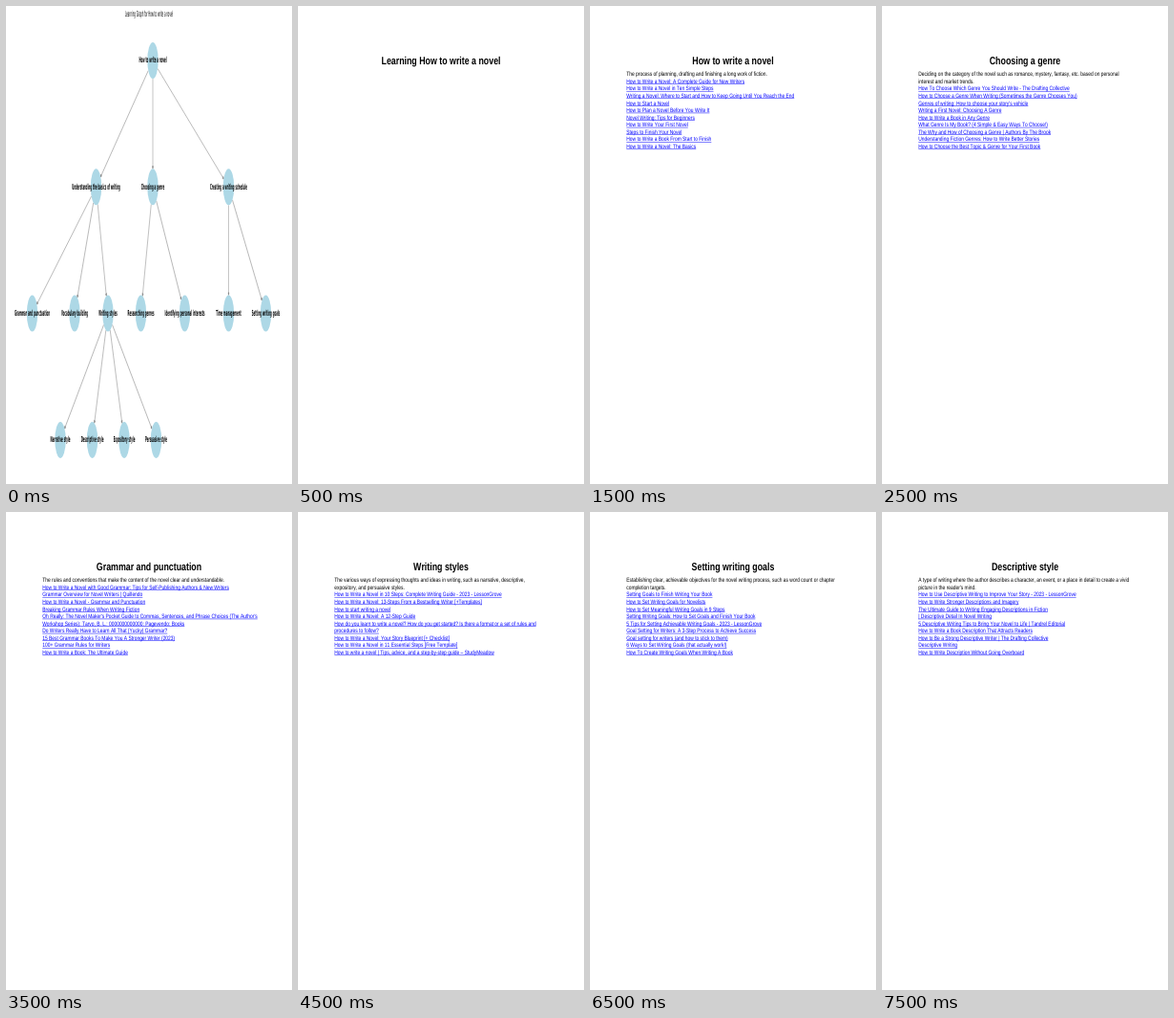
These frames come from a looping animation (300x500 px, 8000 ms). An HTML page with a canvas:

```html
<!DOCTYPE html>
<html lang="en">
<head>
<meta charset="utf-8">
<title>How to write a novel</title>
<style>
html, body { margin: 0; width: 100%; height: 100%; overflow: hidden; background: #fff; }
canvas { display: block; width: 300px; height: 500px; }
</style>
</head>
<body>
<canvas id="stage" width="300" height="500"></canvas>
<script>
const ctx = document.getElementById('stage').getContext('2d');
const W = 300, H = 500, HOLD = 500;
const SANS = '"Liberation Sans", Arial, sans-serif';
const CHART = '"DejaVu Sans", sans-serif';

// Sheets are drawn in points and squeezed onto the stage.
function sheet(w, h) {
  ctx.setTransform(1, 0, 0, 1, 0, 0);
  ctx.fillStyle = '#fff';
  ctx.fillRect(0, 0, W, H);
  ctx.setTransform(W / w, 0, 0, H / h, 0, 0);
  ctx.fontKerning = 'none';
  ctx.textRendering = 'geometricPrecision';
}

function text(str, x, y, font, color = '#000', align = 'left') {
  ctx.font = font;
  ctx.fillStyle = color;
  ctx.textAlign = align;
  ctx.fillText(str, x, y);
}

// Learning graph: label, x, level, index of the parent
const nodes = [
  ['How to write a novel', 154, 0, -1],
  ['Understanding the basics of writing', 94.5, 1, 0],
  ['Choosing a genre', 154, 1, 0],
  ['Creating a writing schedule', 233.5, 1, 0],
  ['Grammar and punctuation', 27.5, 2, 1],
  ['Vocabulary building', 72, 2, 1],
  ['Writing styles', 107, 2, 1],
  ['Researching genres', 141.5, 2, 2],
  ['Identifying personal interests', 187.5, 2, 2],
  ['Time management', 233.5, 2, 3],
  ['Setting writing goals', 272.5, 2, 3],
  ['Narrative style', 57, 3, 6],
  ['Descriptive style', 90.5, 3, 6],
  ['Expository style', 124, 3, 6],
  ['Persuasive style', 157.5, 3, 6]
].map(([label, x, level, parent]) =>
  ({ label, parent, x: x * 4.8, y: (57 + level * 132.3) * 1.44 }));

function arrow(a, b, r) {
  const angle = Math.atan2(b.y - a.y, b.x - a.x);
  const len = Math.hypot(b.x - a.x, b.y - a.y);
  ctx.save();
  ctx.translate(a.x, a.y);
  ctx.rotate(angle);
  ctx.strokeStyle = ctx.fillStyle = '#808080';
  ctx.lineWidth = 1;
  ctx.beginPath();
  ctx.moveTo(r, 0);
  ctx.lineTo(len - r - 1, 0);
  ctx.stroke();
  ctx.beginPath();
  ctx.moveTo(len - r, 0);
  ctx.lineTo(len - r - 4, -2);
  ctx.lineTo(len - r - 4, 2);
  ctx.closePath();
  ctx.fill();
  ctx.stroke();
  ctx.restore();
}

function drawGraph() {
  const r = Math.sqrt(3000) / 2;
  sheet(1440, 720);
  text('Learning Graph for How to write a novel', 720, 16, '12px ' + CHART, '#000', 'center');
  for (const n of nodes) if (n.parent >= 0) arrow(nodes[n.parent], n, r);
  ctx.fillStyle = '#add8e6';
  for (const n of nodes) {
    ctx.beginPath();
    ctx.arc(n.x, n.y, r, 0, 2 * Math.PI);
    ctx.fill();
  }
  for (const n of nodes) text(n.label, n.x, n.y + 3.3, 'bold 12px ' + CHART, '#000', 'center');
}

function heading(str) {
  sheet(612, 792);
  text(str, 306, 96, 'bold 18px ' + SANS, '#000', 'center');
}

function drawContents() {
  const left = 234, top = 118, width = 144, row = 28.8;
  heading('Table of Contents');
  nodes.forEach((n, i) => {
    const y = top + i * row;
    ctx.fillStyle = i ? '#f5f5dc' : '#808080';
    ctx.fillRect(left, y, width, row);
    const lines = i === 1 ? ['Understanding the basics of', 'writing'] : [n.label];
    const base = y + row - (i ? 5 : 14);
    lines.forEach((s, k) =>
      text(s, left + 6, base - (lines.length - 1 - k) * 12, '10px ' + SANS));
  });
  ctx.strokeStyle = '#000';
  ctx.lineWidth = 1;
  ctx.beginPath();
  for (let i = 0; i <= nodes.length; i++) {
    ctx.moveTo(left, top + i * row);
    ctx.lineTo(left + width, top + i * row);
  }
  for (const x of [left, left + width]) {
    ctx.moveTo(x, top);
    ctx.lineTo(x, top + nodes.length * row);
  }
  ctx.stroke();
}

function drawPage(title, [intro, links]) {
  let y = 116;
  heading(title);
  for (const s of intro.split('\n')) {
    text(s, 78, y, '10px ' + SANS);
    y += 12;
  }
  for (const s of links.trim().split('\n')) {
    text(s, 78, y, '10px ' + SANS, '#00f');
    ctx.fillRect(78, y + 0.9, ctx.measureText(s).width, 0.8);
    y += 12;
  }
}

// Intro and links for each topic, in the order of the nodes
const pages = [
  ['The process of planning, drafting and finishing a long work of fiction.', `
How to Write a Novel: A Complete Guide for New Writers
How to Write a Novel in Ten Simple Steps
Writing a Novel: Where to Start and How to Keep Going Until You Reach the End
How to Start a Novel
How to Plan a Novel Before You Write It
Novel Writing: Tips for Beginners
How to Write Your First Novel
Steps to Finish Your Novel
How to Write a Book From Start to Finish
How to Write a Novel: The Basics`],
  ['Learning the essential parts of writing, such as grammar, vocabulary, and the many styles that\ncan be used in a novel.', `
The Basics of Writing: A Guide for Beginners
Basic Writing Skills Every Novelist Needs
How to Learn the Basics of Creative Writing
Understanding the Elements of a Novel
Writing Basics: How to Build Better Sentences
The Basics of Fiction Writing
How to Improve Your Writing Skills in 10 Steps
Creative Writing for Beginners
What Every New Writer Should Know`],
  ['Deciding on the category of the novel such as romance, mystery, fantasy, etc. based on personal\ninterest and market trends.', `
How To Choose Which Genre You Should Write - The Drafting Collective
How to Choose a Genre When Writing (Sometimes the Genre Chooses You)
Genres of writing: How to choose your story's vehicle
Writing a First Novel: Choosing A Genre
How to Write a Book in Any Genre
What Genre Is My Book? (4 Simple & Easy Ways To Choose!)
The Why and How of Choosing a Genre | Authors By The Brook
Understanding Fiction Genres: How to Write Better Stories
How to Choose the Best Topic & Genre for Your First Book`],
  ['Planning regular times for working on the novel in order to make steady progress and to\nfinish on time.', `
How to Create a Writing Schedule That Works
Creating a Writing Schedule: Tips for Busy Writers
How to Make a Writing Schedule and Stick to It
Writing Schedules: How to Find Your Best Time
How to Build a Daily Writing Habit
A Simple Writing Plan for Your First Novel
How to Plan Your Writing Week
Writing Every Day: Is It Really Needed?
How to Set Up a Writing Routine`],
  ['The rules and conventions that make the content of the novel clear and understandable.', `
How to Write a Novel with Good Grammar: Tips for Self-Publishing Authors & New Writers
Grammar Overview for Novel Writers | Quillendo
How to Write a Novel - Grammar and Punctuation
Breaking Grammar Rules When Writing Fiction
Oh Really: The Novel Maker's Pocket Guide to Commas, Sentences, and Phrase Choices (The Author's
Workshop Series): Tarvo, B. L.: 0000000000000: Pagevendo: Books
Do Writers Really Have to Learn All That (Yucky) Grammar?
15 Best Grammar Books To Make You A Stronger Writer (2023)
100+ Grammar Rules for Writers
How to Write a Book: The Ultimate Guide`],
  ['Expanding the range of words known and used, so that the writing is more precise and engaging\nfor the reader.', `
How to Build Your Vocabulary as a Writer
Vocabulary Building: Tips for Novel Writers
10 Ways to Improve Your Vocabulary
How to Use New Words in Your Writing
Building a Better Vocabulary for Fiction
Words Every Writer Should Know
How to Expand Your Vocabulary by Reading
Vocabulary Exercises for Creative Writers
Simple Ways to Learn New Words`],
  ['The various ways of expressing thoughts and ideas in writing, such as narrative, descriptive,\nexpository, and persuasive styles.', `
How to Write a Novel in 10 Steps: Complete Writing Guide - 2023 - LessonGrove
How to Write a Novel: 13-Steps From a Bestselling Writer [+Templates]
How to start writing a novel
How to Write a Novel: A 12-Step Guide
How do you learn to write a novel? How do you get started? Is there a format or a set of rules and
procedures to follow?
How to Write a Novel: Your Story Blueprint [+ Checklist]
How to Write a Novel in 11 Essential Steps [Free Template]
How to write a novel | Tips, advice, and a step-by-step guide – StudyMeadow`],
  ['Studying the features and conventions of different genres to find out what readers expect of\neach one.', `
How to Research Your Genre Before Writing
Researching Genres: A Guide for Novelists
Book Genres: A Complete List for Writers
How to Study a Genre by Reading
What Readers Expect From Each Genre
Genre Research Tips for New Writers
How to Research a Novel
Fiction Genres and Their Conventions
How to Find the Right Genre for Your Book`],
  ['Reflecting on the themes, subjects and kinds of story that you enjoy in order to find a genre\nthat suits you.', `
How to Find Out What You Want to Write About
Identifying Your Interests as a Writer
Writing What You Love: Finding Your Subject
How to Discover Your Passion for Writing
Finding Ideas for a Novel in Your Own Life
Should You Write What You Know?
How to Choose a Topic for Your Book
Questions to Ask Before You Start a Novel
Finding Your Voice and Your Themes
How to Turn Your Interests Into a Story`],
  ['Making good use of the hours available for writing, while balancing it with other duties and\nactivities.', `
Time Management for Writers
How to Find Time to Write a Novel
Time Management Tips for Busy Novelists
How to Manage Your Writing Time Well
8 Ways to Make More Time for Writing
Balancing Writing With a Full-Time Job
How to Stop Putting Off Your Writing
Writing Faster: How to Use Short Sessions
How to Protect Your Writing Time`],
  ['Establishing clear, achievable objectives for the novel writing process, such as word count or chapter\ncompletion targets.', `
Setting Goals to Finish Writing Your Book
How to Set Writing Goals for Novelists
How to Set Meaningful Writing Goals in 9 Steps
Setting Writing Goals: How to Set Goals and Finish Your Book
5 Tips for Setting Achievable Writing Goals - 2023 - LessonGrove
Goal Setting for Writers: A 3-Step Process to Achieve Success
Goal setting for writers (and how to stick to them)
6 Ways to Set Writing Goals (that actually work!)
How To Create Writing Goals When Writing A Book`],
  ['A type of writing that tells a story, with characters, a conflict, a setting and a plot that moves from\nbeginning to end.', `
Narrative Writing: A Guide for Beginners
What Is Narrative Style? Types and Examples
How to Write in a Narrative Style
Narrative Techniques for Fiction Writers
Choosing the Narrative Voice for Your Novel
How to Use Point of View in a Story
Narrative Structure: How to Shape Your Novel
Elements of Narrative Writing
How to Tell a Story That Holds the Reader`],
  ["A type of writing where the author describes a character, an event, or a place in detail to create a vivid\npicture in the reader's mind.", `
How to Use Descriptive Writing to Improve Your Story - 2023 - LessonGrove
How to Write Stronger Descriptions and Imagery
The Ultimate Guide to Writing Engaging Descriptions in Fiction
| Descriptive Detail In Novel Writing
5 Descriptive Writing Tips to Bring Your Novel to Life | Tandrel Editorial
How to Write a Book Description That Attracts Readers
How to Be a Strong Descriptive Writer | The Drafting Collective
Descriptive Writing
How to Write Description Without Going Overboard`]
];

const slides = [
  drawGraph,
  () => heading('Learning How to write a novel'),
  drawContents,
  ...pages.map((page, i) => () => drawPage(nodes[i].label, page))
];

let shown = -1;
function tick() {
  const i = Math.floor(performance.now() / HOLD) % slides.length;
  if (i !== shown) slides[shown = i]();
  requestAnimationFrame(tick);
}
tick();
</script>
</body>
</html>
```
